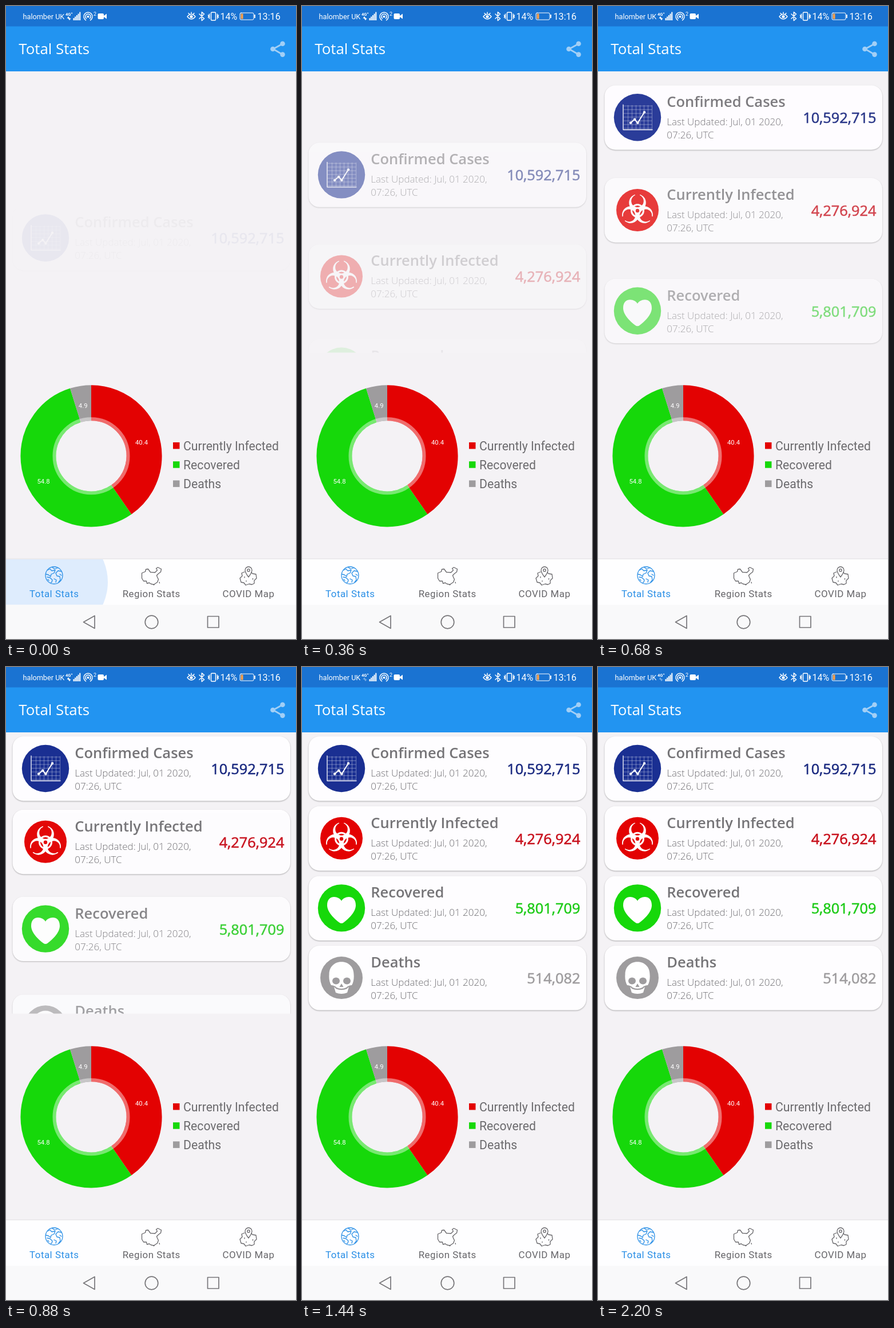
Recreate the animation shown at these times as an HTML page. Size 507 px wide and 1104 px high, loop 2240 ms.

```html
<!DOCTYPE html>
<html lang="en">
<head>
<meta charset="utf-8">
<title>Total Stats</title>
<style>
html, body { margin: 0; width: 100%; height: 100%; overflow: hidden; background: #f4f2f5; }
svg { display: block; }
text { font-family: Roboto, sans-serif; white-space: pre; }
.sans text, text.sans { font-family: "Open Sans", sans-serif; font-size: 25.35px; }
text.title { font-size: 25.8px; }
.sans .name { font-weight: 600; font-size: 25.5px; fill: #757477; }
.sans .date { font-weight: 300; font-size: 17px; fill: #6f6e72; }
.count { text-anchor: end; stroke-width: .6px; }
.card { fill: #fefdff; filter: drop-shadow(0 1px 1.3px rgba(0,0,0,.3)); }
.line { fill: none; stroke-linecap: round; stroke-linejoin: round; }
.legend { font-size: 21.2px; fill: #6c6b6e; }
.pct { font-size: 11.3px; fill: #fff; text-anchor: middle; }
.tab { font-size: 16.9px; letter-spacing: .5px; text-anchor: middle; }
</style>
</head>
<body>
<svg width="507" height="1104" viewBox="0 0 507 1104">
  <defs>
    <clipPath id="list"><rect y="114" width="507" height="490.5"/></clipPath>
    <clipPath id="bar"><rect y="965" width="507" height="79.5"/></clipPath>
  </defs>
  <rect width="507" height="1104" fill="#f4f2f5"/>
  <g id="cards" class="sans" clip-path="url(#list)"></g>

  <!-- header -->
  <rect width="507" height="36" fill="#1a73d2"/>
  <rect y="35.5" width="507" height="78.5" fill="#2294f1"/>
  <text class="sans title" x="22.3" y="84.2" fill="#fff">Total Stats</text>
  <g fill="#a2cff6">
    <path class="line" d="M482.5 66.5 467 75l15.5 9" stroke="#a2cff6" stroke-width="2.8"/>
    <circle cx="483.5" cy="65.8" r="4.3"/><circle cx="466.5" cy="75" r="4.3"/><circle cx="483.5" cy="84.6" r="4.3"/>
  </g>

  <!-- status bar -->
  <g fill="#fff">
    <text x="29.5" y="22.5" font-size="12.7">halomber UK</text>
    <text x="104" y="16.5" font-size="7.5" font-weight="700">4G⁺</text>
    <path id="arrows" d="M106.5 21.5h5l-2.5-3.5zM108.5 21.5h5l-2.5 3.5z"/>
    <path d="M117.5 21h2v4h-2zM120.2 18.5h2V25h-2zM122.9 16h2v9h-2zM125.6 13.5h2V25h-2zM128.3 10.5h2V25h-2z"/>
    <circle cx="143.5" cy="18.5" r="2"/>
    <text x="153" y="17" font-size="9">2</text>
    <rect x="160.5" y="13" width="10.5" height="10" rx="2"/>
    <path d="M171 17l5-3.5v9L171 19z"/>
    <circle cx="324" cy="18.5" r="2.6"/>
    <text x="374.5" y="24" font-size="16">14%</text>
    <text x="439.5" y="24" font-size="16.2">13:16</text>
    <path d="M434 15h1.8v6H434z"/>
  </g>
  <g class="line" stroke="#fff" stroke-width="1.5">
    <path d="M140.5 21.8a4.5 4.5 0 1 1 6 0M139.5 24.8a7.5 7.5 0 1 1 8 0"/>
    <path d="M317 18.5q7-8.5 14 0q-7 8.5-14 0zM319 12.5l1.5 1.5M324 11v1.5M329 12.5l-1.5 1.5"/>
    <path d="M338 14l8.5 8-4.2 3.5v-15l4.2 3.5-8.5 8"/>
    <rect x="358.5" y="11" width="8" height="14" rx="1.5"/>
    <path d="M355.5 14v8M369.5 14v8M353.5 16l1 2-1 2M371.5 16l-1 2 1 2"/>
    <rect x="409" y="12" width="24" height="12" rx="2" stroke-width="1"/>
  </g>
  <rect x="410.5" y="13.5" width="4" height="9" fill="#f7a04b"/>

  <!-- chart -->
  <g id="donut" fill="none" transform="translate(149 784.8) rotate(-90)"></g>
  <circle cx="149" cy="784.8" r="64.5" fill="none" stroke="#fff" stroke-width="6" opacity=".42"/>
  <text class="pct" x="237" y="765">40.4</text>
  <text class="pct" x="65.5" y="833">54.8</text>
  <text class="pct" x="134.7" y="701">4.9</text>
  <g id="legend" class="legend"></g>

  <!-- tabs -->
  <rect y="963.5" width="507" height="2" fill="#e9e8ea"/>
  <rect y="965" width="507" height="80" fill="#fefeff"/>
  <circle id="ripple" cx="84" cy="1004.5" r="94" fill="#deecfd" clip-path="url(#bar)"/>
  <text class="tab" x="84.2" y="1030.5" fill="#2a8fe6">Total Stats</text>
  <text class="tab" x="254.2" y="1030.5" fill="#67666a">Region Stats</text>
  <text class="tab" x="424" y="1030.5" fill="#67666a">COVID Map</text>
  <g class="line" stroke="#2a8fe6" stroke-width="1.3">
    <circle cx="84" cy="993" r="15"/>
    <path d="M72 984l5-2 3 3 6-1-2 5-5 2-1 4-4-3-4-1M81 979l4 3 5-2M97 986l-6-1-4 4 2 5 5 1 1 6-3 4M97 993l-3-2"/>
    <path d="M72 996l5 1 4 4-1 4-2 1M73 1000l2 2M84 999l4 2-1 4"/>
  </g>
  <g class="line" stroke="#67666a" stroke-width="1.3">
    <path d="M237.5 989l6-2.500 1-4 4-.5 4 5.500 8 .5 4-4-2-3 3-2 6 3-1 5-4 3-3 3 1 3 2 4-2 5-6 4-5-1-3-2-4 1-1-4-5 0-3-5z"/>
    <path d="M258 1009.5h1M268 1005l.5 1.5"/>
    <path d="M417 987l-5 2 1 5-4 4 2 7 5 1 3 4 6-2 5 1 4-2 0-5 4-4-1-7-6-1-2-2"/>
    <path d="M424 996q-6-8-6-12a6 6 0 0 1 12 0q0 4-6 12z"/>
    <circle cx="424" cy="984" r="2.2"/>
    <path d="M417 995.5v1.5M431.5 998.5v1.5M420 1002.5v1"/>
  </g>

  <!-- system buttons -->
  <rect y="1044.5" width="507" height="60" fill="#f9f9fa"/>
  <g class="line" stroke="#777679" stroke-width="1.7">
    <path d="M135.500 1074.5l19.5-11v22z"/>
    <circle cx="254.5" cy="1074.5" r="11.3"/>
    <rect x="352.5" y="1064.5" width="19.5" height="19.5"/>
  </g>
</svg>
<script>
const $ = id => document.getElementById(id);
const LOOP = 2240, RISE = 240, RISE_MS = 1000;
const RED = '#e30202', GREEN = '#16d80a', GREY = '#9e9c9e';

// Icons are drawn around the centre of their disc.
const disc = (r, color) => `<circle r="${r}" fill="${color}"/>`;

function chartIcon(color) {
  let grid = '';
  for (let i = 0; i <= 6; i++) grid += `M-24 ${-20 + i * 6.5}h49M${-16.5 + i * 7} -21v41`;
  const dots = [[-12, 9.5], [-5, 3.5], [0.5, 9.5], [12, -9]];
  return disc(41.2, color) + `<g class="line" stroke="#fff">
    <path d="${grid}" stroke-width=".8" opacity=".45"/>
    <path d="M-25 -22V21.5H26" stroke-width="1.3"/>
    <polyline points="${dots}" stroke-width="1.9"/></g>` +
    dots.map(([x, y]) => `<circle cx="${x}" cy="${y}" r="2.2" fill="#fff"/>`).join('');
}

function hazardIcon(color) {
  const arms = shape => [0, 120, 240].map(a => `<g transform="rotate(${a})">${shape}</g>`).join('');
  return disc(37, color) + '<g transform="translate(0 1)">' +
    arms('<circle cy="-14" r="14.8" fill="#fff"/>') +
    arms(`<circle cy="-16.8" r="10.8" fill="${color}"/><path d="M-5 -31h10l-2 8h-6z" fill="${color}"/>`) +
    '<circle r="10.5" fill="none" stroke="#fff" stroke-width="3"/>' + disc(3.2, color) + '</g>';
}

const heartIcon = color => disc(41.2, color) +
  '<path fill="#fff" d="M0 -12.5C4 -21 25 -25 25 -5C25 7 12 19 4 25Q0 28 -4 25C-12 19 -25 7 -25 -5C-25 -25 -4 -21 0 -12.5z"/>';

const skullIcon = color => disc(37, color) + `
  <path fill="#fff" d="M-21.5 -6C-21.5 -35 21.5 -35 21.5 -6Q22.5 5 18 13L13 16 10 26Q0 30 -10 26L-13 16 -18 13Q-22.5 5 -21.5 -6z"/>
  <g fill="${color}"><ellipse cx="-9.5" cy="5.5" rx="6.5" ry="6"/><ellipse cx="9.5" cy="5.5" rx="6.5" ry="6"/>
  <path d="M0 10l3.5 6h-7z"/></g>
  <path class="line" d="M-17 14Q-11 15 -9 18Q0 22 9 18Q11 15 17 14" stroke="${color}" stroke-width="2.4"/>`;

const stats = [
  ['Confirmed Cases', '10,592,715', '#1a2f92', '#1b2a80', chartIcon],
  ['Currently Infected', '4,276,924', RED, '#c8101c', hazardIcon],
  ['Recovered', '5,801,709', GREEN, '#1ecb18', heartIcon],
  ['Deaths', '514,082', GREY, GREY, skullIcon],
];

$('cards').innerHTML = stats.map(([name, count, color, ink, icon]) => `<g>
  <rect class="card" x="11.5" width="485.5" height="112.5" rx="19"/>
  <g transform="translate(69 56)">${icon(color)}</g>
  <text class="name" x="120.3" y="38">${name}</text>
  <text class="date" x="120.3" y="70">Last Updated: Jul, 01 2020,</text>
  <text class="date" x="120.3" y="93">07:26, UTC</text>
  <text class="count" x="486.5" y="66" fill="${ink}" stroke="${ink}">${count}</text></g>`).join('');

const slices = [['Currently Infected', 40.37, RED], ['Recovered', 54.78, GREEN], ['Deaths', 4.85, GREY]];
let start = 0;
slices.forEach(([name, share, color], i) => {
  $('donut').innerHTML += `<circle r="92.6" pathLength="100" stroke="${color}"
    stroke-width="62" stroke-dasharray="${share} 100" stroke-dashoffset="${-start}"/>`;
  $('legend').innerHTML += `<rect x="292" y="${761 + i * 33.2}" width="11.5" height="11.5" fill="${color}"/>
    <text x="310" y="${775 + i * 33.2}">${name}</text>`;
  start += share;
});

const cards = [...$('cards').children];

function draw(now) {
  const t = now % LOOP;
  const clock = t + Math.max(0, t - 680) * 0.115; // the rise quickens slightly
  cards.forEach((card, i) => {
    const u = Math.min(1, Math.max(0, (clock + 146 - 152 * i) / RISE_MS));
    const left = (1 + Math.cos(Math.PI * u)) / 2;
    card.setAttribute('transform', `translate(0 ${121 + 121.7 * i + RISE * left})`);
    card.setAttribute('opacity', 1 - left);
  });
  $('ripple').setAttribute('opacity', Math.max(0, 1 - t / 280));
  $('arrows').setAttribute('opacity', t < 1240 ? 1 : 0.4);
}

const begin = performance.now();
function tick() {
  draw(performance.now() - begin);
  requestAnimationFrame(tick);
}
tick();
</script>
</body>
</html>
```
